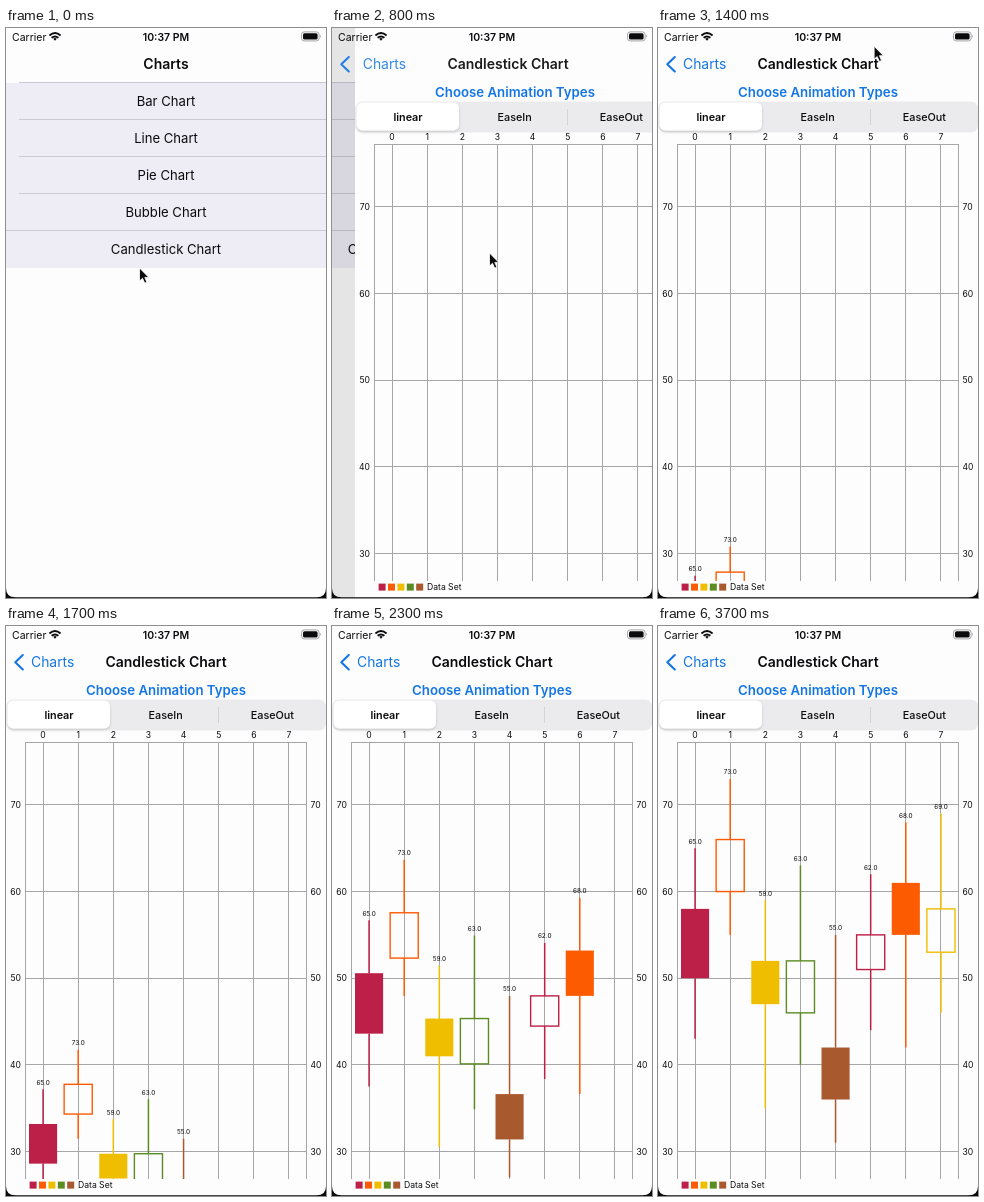
Recreate the animation shown at these times as an HTML page. Size 320 px wide and 570 px high, loop 3800 ms.

```html
<!DOCTYPE html>
<html lang="en">
<head>
<meta charset="utf-8">
<title>Charts</title>
<style>
  html, body { margin: 0; width: 100%; height: 100%; overflow: hidden; background: #fefdfe; }
  svg { display: block; width: 320px; height: 570px; font-family: Inter, Roboto, sans-serif; }
  text { fill: #0b0b0d; }
  .mid { text-anchor: middle; }
  .end { text-anchor: end; }
  .title { font-size: 14px; font-weight: 600; }
  .back { font-size: 13.9px; }
  .row { font-size: 13.1px; }
  .choose { font-size: 13.25px; font-weight: 600; }
  .seg { font-size: 10.8px; font-weight: 500; }
  .on { font-weight: 600; }
  .axis { font-size: 8.6px; }
  .value { font-size: 6.4px; }
  .status { font-size: 10.5px; }
  .blue { fill: #1476e4; }
  .grid { stroke: #a6a6a8; shape-rendering: crispEdges; }
  .sep { stroke: #cbcad0; shape-rendering: crispEdges; }
</style>
</head>
<body>
<svg viewBox="0 0 320 570">
  <defs>
    <clipPath id="plot"><rect x="19" y="117" width="282" height="436"/></clipPath>
    <filter id="soft" x="-10%" y="-20%" width="120%" height="150%">
      <feDropShadow dx="0" dy="1.5" stdDeviation="1.5" flood-opacity=".16"/>
    </filter>
  </defs>
  <rect width="320" height="570" fill="#fefdfe"/>
  <g id="list"></g>
  <rect id="dim" width="320" height="570"/>
  <g id="page">
    <rect width="320" height="570" fill="#fefdfe"/>
    <rect x=".5" y="73.5" width="319.5" height="31" rx="7" fill="#ebebed"/>
    <rect x="1.5" y="74.5" width="102.5" height="28" rx="6" fill="#fff" filter="url(#soft)"/>
    <path d="M212.5 81V97" stroke="#d3d3d7"/>
    <g id="grid"></g>
    <g id="candles" clip-path="url(#plot)"></g>
    <g id="values"></g>
  </g>
  <g id="nav">
    <text id="oldTitle" class="title mid" x="160" y="41">Charts</text>
    <text id="newTitle" class="title mid" x="160" y="41">Candlestick Chart</text>
    <path id="chevron" d="M16.8 29L9.3 36.2L16.8 43.4" fill="none" stroke="#1476e4" stroke-width="2.1" stroke-linecap="round" stroke-linejoin="round"/>
    <text id="back" class="back blue" x="25" y="41">Charts</text>
  </g>
  <text class="status" x="6" y="12.7">Carrier</text>
  <text class="status mid on" x="160" y="12.7">10:37 PM</text>
  <g fill="none" stroke="#0b0b0d" stroke-width="1.9">
    <path d="M43.4 7.4Q49 2.8 54.6 7.4M45.6 9.8Q49 7 52.4 9.8"/>
    <path d="M47.2 10.8Q49 9.4 50.8 10.8L49 12.8Z" fill="#0b0b0d" stroke="none"/>
  </g>
  <rect x="295.5" y="3.9" width="17.6" height="9" rx="2.6" fill="none" stroke="#9b9b9d" stroke-width=".9"/>
  <rect x="297" y="5.3" width="14.6" height="6.2" rx="1.5" fill="#0b0b0d"/>
  <path d="M314.2 6.8Q316 8.4 314.2 10Z" fill="#9b9b9d"/>
  <path d="M0 560Q0 569.3 9.5 569.3H310.5Q320 569.3 320 560V570H0Z" fill="#0b0b0d"/>
  <path id="cursor" d="M0 0V13L3 10.3L5.2 15.1L7.4 14.2L5.3 9.4H9.3Z" fill="#0b0b0d" stroke="#fff" stroke-width=".8"/>
</svg>
<script>
const LOOP = 3800, TICK = 100;
const PUSH = 564.5, SPRING = 0.01825;
const GROW = 556, GROW_TIME = 2000;
const COLORS = ['#bc1f47', '#fd5b02', '#f0be00', '#5b8c24', '#a8592d'];
// high, low, body top, body bottom
const DATA = [
  [65, 43, 58, 50], [73, 55, 66, 60], [59, 35, 52, 47], [63, 40, 52, 46],
  [55, 31, 42, 36], [62, 44, 55, 51], [68, 42, 61, 55], [69, 46, 58, 53]
];
// time, x, y of the pointer
const POINTER = [[0, 133.5, 240], [250, 168, 207], [400, 157.5, 225], [1100, 157.5, 225], [1500, 227, -20]];

const $ = id => document.getElementById(id);
const clamp = v => Math.min(1, Math.max(0, v));
const colX = i => 37.06 + 35.125 * i;
const valY = v => 525.5 - (v - 30) * 8.665;

function set(el, attrs) {
  for (const k in attrs) el.setAttribute(k, attrs[k]);
  return el;
}
function add(parent, tag, attrs, text) {
  const el = set(document.createElementNS('http://www.w3.org/2000/svg', tag), attrs);
  if (text !== undefined) el.textContent = text;
  parent.append(el);
  return el;
}
const label = (parent, cls, x, y, text) => add(parent, 'text', { class: cls, x, y }, text);
const line = (parent, cls, d) => add(parent, 'path', { class: cls, d });

function buildList() {
  const list = $('list');
  add(list, 'rect', { y: 55, width: 334, height: 185, fill: '#eeedf6' });
  ['Bar', 'Line', 'Pie', 'Bubble', 'Candlestick'].forEach((name, i) => {
    const y = 54.5 + 37 * i;
    line(list, 'sep', `M${i === 4 ? 0 : 13} ${y}H334`);
    label(list, 'row mid', 160, y + 23, name + ' Chart');
  });
}

function buildChart() {
  const page = $('page'), grid = $('grid');
  label(page, 'choose mid blue', 160, 68.8, 'Choose Animation Types');
  ['linear', 'EaseIn', 'EaseOut'].forEach((s, i) =>
    label(page, 'seg mid' + (i ? '' : ' on'), 53 + 106.7 * i, 92.8, s));
  line(grid, 'grid', 'M19.5 553V116.5H300.5V553').setAttribute('fill', 'none');
  for (let v = 30; v <= 70; v += 10) {
    const y = valY(v);
    line(grid, 'grid', `M19.5 ${y}H300.5`);
    label(grid, 'axis end', 15, y + 3, v);
    label(grid, 'axis', 304.5, y + 3, v);
  }
  DATA.forEach((_, i) => {
    line(grid, 'grid', `M${colX(i)} 117V553`);
    label(grid, 'axis mid', colX(i), 112, i);
  });
  COLORS.forEach((fill, i) =>
    add(page, 'rect', { x: 23.6 + 9.4 * i, y: 555.6, width: 7, height: 7, fill }));
  label(page, 'axis', 72, 562.3, 'Data Set');
}

function buildCandles() {
  return DATA.map((values, i) => {
    const color = COLORS[i % 5];
    const wick = add($('candles'), 'path', { stroke: color, 'stroke-width': 1.5 });
    const body = add($('candles'), 'rect', {
      x: colX(i) - 14.05, width: 28.1, stroke: color,
      'stroke-width': i % 2 ? 1.4 : 0, fill: i % 2 ? 'none' : color
    });
    const tag = label($('values'), 'value mid', colX(i), 0, values[0].toFixed(1));
    return { values, wick, body, tag };
  });
}

function drawCandles(phase) {
  const last = Math.floor((DATA.length - 1) * phase);
  candles.forEach(({ values, wick, body, tag }, i) => {
    const [high, low, top, bottom] = values.map(v => valY(v * phase));
    const shown = i <= last;
    wick.style.display = body.style.display = shown ? '' : 'none';
    tag.style.display = shown && high < 553 ? '' : 'none';
    set(wick, { d: `M${colX(i)} ${high}V${top}M${colX(i)} ${bottom}V${low}` });
    set(body, { y: top, height: bottom - top });
    set(tag, { y: high - 4.5 });
  });
}

function drawPush(t) {
  const u = Math.max(0, t - PUSH) * SPRING;
  const rest = (1 + u) * Math.exp(-u), p = 1 - rest;
  const shift = (el, x) => set(el, { transform: `translate(${x})` });
  shift($('page'), Math.round(320 * rest));
  shift($('list'), Math.round(-96 * p));
  shift($('oldTitle'), -80 * p);
  shift($('newTitle'), Math.round(225 * rest));
  shift($('back'), 80 * rest);
  set($('dim'), { opacity: 0.1 * p });
  set($('oldTitle'), { opacity: clamp(1 - 1.6 * p * p) });
  set($('newTitle'), { opacity: p });
  set($('chevron'), { opacity: p });
  set($('back'), { opacity: p * p });
}

function drawPointer(t) {
  let i = 0;
  while (i < POINTER.length - 2 && t >= POINTER[i + 1][0]) i++;
  const [t0, x0, y0] = POINTER[i], [t1, x1, y1] = POINTER[i + 1];
  const k = clamp((t - t0) / (t1 - t0)), e = k * k * (3 - 2 * k);
  set($('cursor'), { transform: `translate(${x0 + (x1 - x0) * e} ${y0 + (y1 - y0) * e})` });
}

function draw(ms) {
  const t = Math.floor(((ms + 2) % LOOP) / TICK) * TICK;
  drawPush(t);
  drawCandles(clamp((t - GROW) / GROW_TIME));
  drawPointer(t);
}

buildList();
buildChart();
const candles = buildCandles();
draw(0);
let start;
requestAnimationFrame(function frame(now) {
  start ??= now;
  draw(now - start);
  requestAnimationFrame(frame);
});
</script>
</body>
</html>
```
